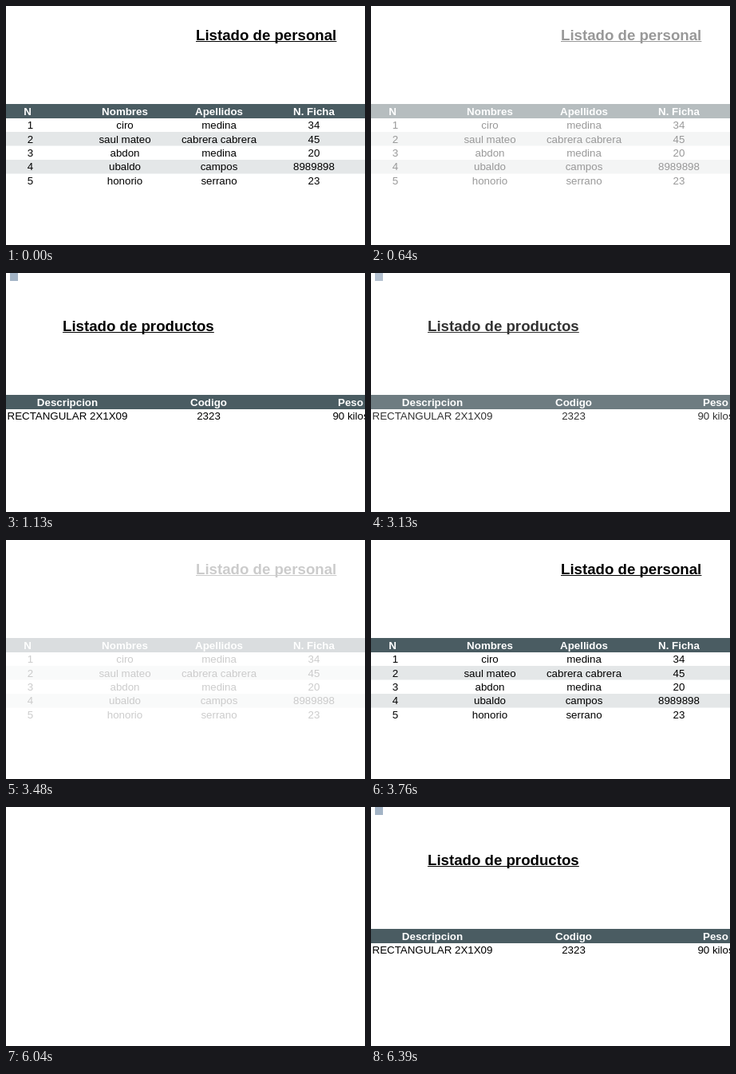
An HTML page for the animation above (8000 ms loop, 450 by 300 pixels).

```html
<!DOCTYPE html>
<html lang="es">
<head>
<meta charset="utf-8">
<title>Listados</title>
<style>
  html, body { margin: 0; width: 100%; height: 100%; overflow: hidden; background: #fff; }
  svg { display: block; width: 450px; height: 300px; }
  text { font: 13.333px "Liberation Sans", Arial, sans-serif; text-anchor: middle; }
  .title { font-size: 18.667px; font-weight: bold; text-anchor: start; }
  .head { font-weight: bold; fill: #fff; }
</style>
</head>
<body>
<svg id="stage" viewBox="0 0 450 300"></svg>
<script>
const NS = "http://www.w3.org/2000/svg";
const stage = document.getElementById("stage");
const DARK = "#4a5c62", STRIPE = "#e4e7e8";
const ROW = 17.4;
const LOOP = 8000, FIRST = 500, PERIOD = 2630, STEP = 70;

function add(parent, tag, attrs, content) {
  const el = document.createElementNS(NS, tag);
  for (const key in attrs) el.setAttribute(key, attrs[key]);
  if (content) el.textContent = content;
  return parent.appendChild(el);
}

const box = (parent, x, y, width, height, fill) =>
  add(parent, "rect", { x, y, width, height, fill });

const label = (parent, x, y, content, cls = "") =>
  add(parent, "text", { x, y, class: cls }, content);

function page({ title, titleX, titleY, titleW, top, heads, columns, rows }) {
  const g = add(stage, "g", {});
  label(g, titleX, titleY, title, "title");
  box(g, titleX, titleY + 1, titleW, 1, "#000");
  box(g, 0, top, 450, 18, DARK);
  heads.forEach(([x, name]) => label(g, x, top + 14, name, "head"));
  rows.forEach((row, i) => {
    const y = top + 18 + i * ROW;
    if (i % 2) box(g, 0, Math.round(y), 450, 17.5, STRIPE);
    row.forEach((cell, c) => label(g, columns[c], Math.round(y + 13.2), cell));
  });
  return g;
}

const staff = page({
  title: "Listado de personal", titleX: 238, titleY: 43, titleW: 176.4, top: 123,
  heads: [[27, "N"], [149, "Nombres"], [267, "Apellidos"], [386, "N. Ficha"]],
  columns: [30.5, 149, 267, 386],
  rows: [
    ["1", "ciro", "medina", "34"],
    ["2", "saul mateo", "cabrera cabrera", "45"],
    ["3", "abdon", "medina", "20"],
    ["4", "ubaldo", "campos", "8989898"],
    ["5", "honorio", "serrano", "23"]
  ]
});

const products = page({
  title: "Listado de productos", titleX: 71, titleY: 73, titleW: 189.8, top: 153,
  heads: [[77, "Descripcion"], [254, "Codigo"], [432, "Peso"]],
  columns: [77, 254, 432],
  rows: [["RECTANGULAR 2X1X09", "2323", "90 kilos"]]
});
box(products, 5, 0, 10, 10, "#a3b4c6");

// Each change fades one page to white and the other in, ten steps in all.
function draw(t) {
  const turn = Math.floor((t - FIRST) / PERIOD);
  const step = Math.min(9, Math.floor((t - FIRST - turn * PERIOD) / STEP));
  const shown = turn < 0 ? 0 : turn + (step >= 4 ? 1 : 0);
  const level = turn < 0 ? 1 : Math.abs(step - 4) / 5;
  staff.style.opacity = shown % 2 ? 0 : level;
  products.style.opacity = shown % 2 ? level : 0;
}

const start = performance.now();
function tick() {
  draw((performance.now() - start) % LOOP);
  requestAnimationFrame(tick);
}
tick();
</script>
</body>
</html>
```
